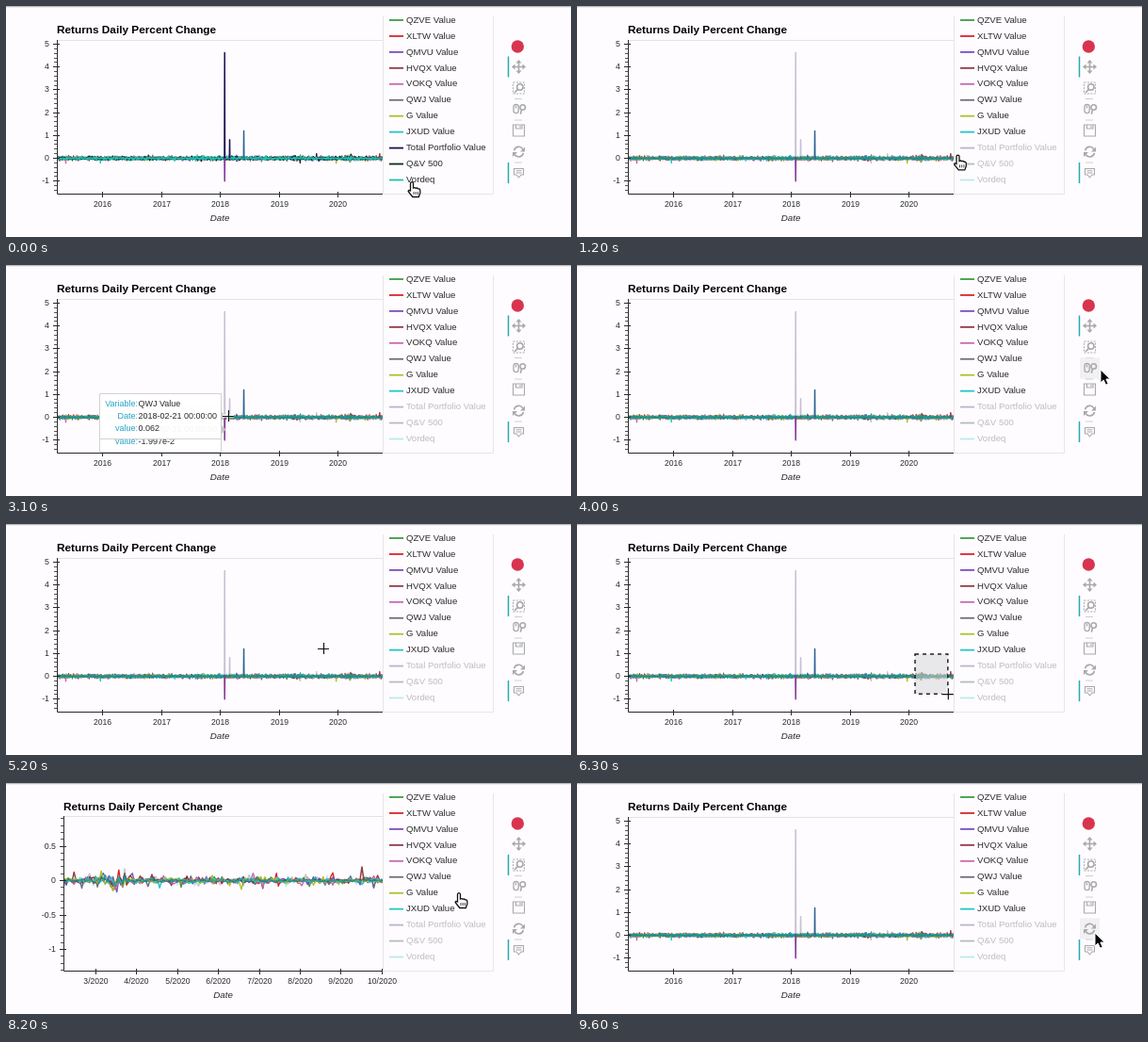
Write an HTML page with a canvas that moves like this. It is 600 px wide and 245 px high and loops after 9.7 s.

```html
<!DOCTYPE html>
<html lang="en">
<head>
<meta charset="utf-8">
<title>Returns chart</title>
<style>
html, body { margin: 0; width: 600px; height: 245px; overflow: hidden; background: #fefcff; }
canvas { display: block; }
</style>
</head>
<body>
<canvas id="stage" width="600" height="245"></canvas>
<script>
const LOOP = 9700, STEP = 100, GLIDE = 900;
const TOOL_CLICK = 4500, DRAG = 5700, ZOOM = 6600, RESET = 8900;
const WIDTH = 600, HEIGHT = 245, RIGHT = 400, BOTTOM = 199;
const FONT = '"Liberation Sans", Arial, sans-serif';
const PAPER = '#fefcff', INK = '#2a2a2a', GRAY = '#a9a9a9', TEAL = '#26aab5';
const ctx = document.getElementById('stage').getContext('2d');

const series = [
  ['QZVE Value', '#3f9a43'], ['XLTW Value', '#d6262b'], ['QMVU Value', '#7c4fc0'],
  ['HVQX Value', '#8f3c46'], ['VOKQ Value', '#c768b2'], ['QWJ Value', '#706c7a'],
  ['G Value', '#a9c526'], ['JXUD Value', '#1fc8cb'], ['Total Portfolio Value', '#1d0f52'],
  ['Q&V 500', '#0a2e12'], ['Vordeq', '#1ebfb2']
].map(([name, color], i) => ({
  name, color,
  // the last three are clicked one by one, from the bottom up
  muteAt: i < 8 ? Infinity : 300 + 250 * (10 - i)
}));
const [, , , brown, , grey, , cyan, portfolio] = series;

const spikes = [
  { year: 2018.08, value: -1, color: '#86379a' },
  { year: 2018.08, value: 4.63, color: portfolio.color, owner: portfolio },
  { year: 2018.165, value: 0.82, color: portfolio.color, owner: portfolio },
  { year: 2018.405, value: 1.2, color: '#2c6291' },
  { year: 2020.71, value: 0.2, color: brown.color }
];

function makeView(left, top, zero, unit, yStep, minor, x0, year0, perYear, xTicks) {
  return {
    left, top, yStep, minor, xTicks,
    x: t => x0 + perYear * (t - year0),
    year: x => year0 + (x - x0) / perYear,
    y: v => zero - v * unit,
    value: y => (zero - y) / unit
  };
}
const range = (n, f) => Array.from({ length: n }, (_, i) => f(i));
const fullView = makeView(54, 36, 161.5, 24.2, 1, 0.2, 102, 2016, 62.6,
  range(5, i => [2016 + i, 2016 + i]));
const zoomView = makeView(61, 35, 103.5, 73, 0.5, 0.1, 95, 2020 + 2 / 12, 520.8,
  range(8, i => [2020 + (i + 2) / 12, `${i + 3}/2020`]));

// the pointer leaves for (x, y) at the given time and gets there before the next move
const moves = [
  [0, 431, 187], [100, 434, 156], [1000, 200, 175], [2100, 252.7, 148.1], [2500, 236, 160],
  [3100, 556, 111], [4100, 548, 88], [4500, 337, 132], [5200, 359, 138], [DRAG, 406, 195],
  [6900, 246, 115], [7600, 380, 98], [8100, 481, 117], [8200, 550, 159]
];

function pointer(t) {
  const i = Math.max(1, moves.findLastIndex(m => m[0] <= t));
  const [, x0, y0] = moves[i - 1], [start, x1, y1] = moves[i];
  const next = i + 1 < moves.length ? moves[i + 1][0] : LOOP;
  const k = Math.min(1, Math.max(0, (t - start) / Math.min(GLIDE, next - start)));
  const ease = k * k * (3 - 2 * k);
  return { x: x0 + (x1 - x0) * ease, y: y0 + (y1 - y0) * ease };
}

function random(a, b) {
  const v = Math.sin(a * 127.1 + b * 311.7) * 43758.5453;
  return v - Math.floor(v);
}
const bell = (seed, day) => random(seed, day) + random(seed + 20, day) + random(seed + 40, day) - 1.5;

// own noise with fat tails, rare shocks, and a market swing shared by all series in March 2020
function dailyReturn(s, day, year) {
  const n = bell(s, day);
  const crash = Math.exp(-(((year - 2020.2) / 0.03) ** 2));
  const shock = random(s + 70, day) > 0.9994 ? 0.2 * Math.sign(n) : 0;
  return 0.022 * n + 0.035 * n ** 3 + shock + crash * (0.12 * bell(90, day) + 0.035 * n);
}

function line(c, color, width, ...points) {
  c.strokeStyle = color;
  c.lineWidth = width;
  c.beginPath();
  for (let i = 0; i < points.length; i += 2) c.lineTo(points[i], points[i + 1]);
  c.stroke();
}

function text(c, str, x, y, size, color = INK, align = 'left', style = '') {
  c.font = `${style} ${size}px ${FONT}`;
  c.fillStyle = color;
  c.textAlign = align;
  c.textBaseline = 'middle';
  c.fillText(str, x, y);
}

function clipped(c, x, y, w, h, paint) {
  c.save();
  c.beginPath();
  c.rect(x, y, w, h);
  c.clip();
  paint();
  c.restore();
}

function drawData(c, view, t) {
  const alpha = s => s && t >= s.muteAt ? 0.25 : 1;
  const firstDay = Math.floor((Math.max(2015.23, view.year(view.left)) - 2015) * 252) - 1;
  c.lineJoin = 'round';
  series.forEach((s, i) => {
    const points = [];
    for (let day = firstDay; day < 1462; day++) {
      const year = 2015 + day / 252;
      points.push(view.x(year), view.y(dailyReturn(i, day, year)));
    }
    c.globalAlpha = alpha(s);
    line(c, s.color, 1.4, ...points);
  });
  for (const { year, value, color, owner } of spikes) {
    c.globalAlpha = alpha(owner);
    line(c, color, 1.5, view.x(year - 0.004), view.y(0), view.x(year), view.y(value),
      view.x(year + 0.004), view.y(0));
  }
}

function drawAxes(c, view) {
  const { left, top } = view;
  const ticks = (step, paint) => {
    const last = Math.floor(view.value(top) / step);
    for (let i = Math.ceil(view.value(BOTTOM) / step); i <= last; i++) {
      paint(i * step, Math.floor(view.y(i * step)) + 0.5);
    }
  };
  line(c, INK, 1, left + 0.5, top, left + 0.5, BOTTOM + 0.5, RIGHT, BOTTOM + 0.5);
  ticks(view.minor, (v, y) => line(c, '#555', 1, left - 3, y, left, y));
  ticks(view.yStep, (v, y) => {
    line(c, INK, 1, left - 4, y, left + 3, y);
    text(c, v, left - 8, y, 8.8, INK, 'right');
  });
  for (const [year, label] of view.xTicks) {
    const x = Math.round(view.x(year)) + 0.5;
    line(c, INK, 1, x, 197, x, 203);
    text(c, label, x, 211, 8.6, INK, 'center');
  }
  text(c, 'Date', (left + RIGHT) / 2, 225, 9.8, INK, 'center', 'italic');
}

function drawLegend(c, t) {
  c.fillStyle = PAPER;
  c.fillRect(RIGHT, 11, 117, BOTTOM - 11);
  line(c, '#e6e6e6', 1, RIGHT + 0.5, 11, RIGHT + 0.5, BOTTOM + 0.5, 517.5, BOTTOM + 0.5, 517.5, 11);
  clipped(c, RIGHT, 10, 117, BOTTOM - 10, () => series.forEach((s, i) => {
    const y = 15 + 16.95 * i;
    c.globalAlpha = t >= s.muteAt ? 0.3 : 1;
    line(c, s.color, 1.8, 407, y, 422, y);
    text(c, s.name, 425, y, 9.6);
  }));
}

// the chart is repainted only when its state changes
const layer = document.createElement('canvas');
layer.width = WIDTH;
layer.height = HEIGHT;
const layerCtx = layer.getContext('2d');
let layerKey;
function chart(view, t) {
  const key = view.left + ':' + series.filter(s => t >= s.muteAt).length;
  if (key !== layerKey) {
    const { left, top } = view;
    layerKey = key;
    layerCtx.clearRect(0, 0, WIDTH, HEIGHT);
    text(layerCtx, 'Returns Daily Percent Change', left, 26, 11.8, '#000', 'left', 'bold');
    line(layerCtx, '#e3e3e3', 1, left, top + 0.5, RIGHT, top + 0.5);
    clipped(layerCtx, left, top, RIGHT - left, BOTTOM - top, () => drawData(layerCtx, view, t));
    drawAxes(layerCtx, view);
    drawLegend(layerCtx, t);
  }
  return layer;
}

function shape(d, fill, stroke, width = 1.3) {
  const p = new Path2D(d);
  if (fill) { ctx.fillStyle = fill; ctx.fill(p); }
  if (stroke) { ctx.strokeStyle = stroke; ctx.lineWidth = width; ctx.stroke(p); }
}

function dashed(dash, ...args) {
  ctx.setLineDash(dash);
  shape(...args);
  ctx.setLineDash([]);
}

const icons = [
  function pan() {
    shape('M-6 0H6M0-6V6', null, GRAY, 1.6);
    shape('M0-7.5l3 3.5h-6zM0 7.5l3-3.5h-6zM-7.5 0l3.5-3v6zM7.5 0l-3.5-3v6z', GRAY);
  },
  function boxZoom() {
    dashed([2, 1.4], 'M-6-6H6V6H-6z', null, GRAY, 1);
    shape('M4.5-1a3.2 3.2 0 1 1-6.4 0a3.2 3.2 0 1 1 6.4 0M-1 1.4L-4.5 5', null, GRAY, 1.6);
  },
  function wheelZoom() {
    shape('M-5.5-2.5a2.6 2.6 0 0 1 5.2 0v4a2.6 2.6 0 0 1-5.2 0zM-3-4v3', null, GRAY);
    shape('M7-2a2.8 2.8 0 1 1-5.6 0a2.8 2.8 0 1 1 5.6 0M3 .8L1.8 5.3', null, GRAY, 1.6);
  },
  function save() {
    shape('M-6-6H6V6H-6zM-3-6v4h6.5v-4M1.5-5v2', null, GRAY, 1.1);
  },
  function reset() {
    shape('M-4.9-1.2a5 5 0 0 1 9.2-1.5M4.9 1.5a5 5 0 0 1-9.2 1.5', null, GRAY, 1.6);
    shape('M6.5-5v5h-5zM-6.5 5.5v-5h5z', GRAY);
  },
  function hover() {
    shape('M-5-4.5H5V2H2.5L0 5L-2.5 2H-5zM-3-2.3H3M-3 0H3', null, GRAY, 1.1);
  }
];

function drawToolbar(t, p) {
  shape('M550 43a6.7 6.7 0 1 1-13.4 0a6.7 6.7 0 1 1 13.4 0', '#d8344f');
  const activeTools = [t < TOOL_CLICK || t >= LOOP ? 0 : 1, 5];
  icons.forEach((icon, i) => {
    const y = 64.5 + 22.5 * i;
    if (p.x > 533 && p.x < 557 && Math.abs(p.y - y) < 11) {
      ctx.fillStyle = '#f1f0f2';
      ctx.fillRect(534, y - 11, 21, 22);
    }
    if (activeTools.includes(i)) line(ctx, TEAL, 1.5, 533.5, y - 11, 533.5, y + 11);
    if (i === 1 || i === 2 || i === 4) line(ctx, '#cfcfcf', 1, 540, y + 11.5, 548, y + 11.5);
    ctx.save();
    ctx.translate(544.5, y);
    icon();
    ctx.restore();
  });
}

function drawTooltip(x, y, name, date, value) {
  const left = Math.round(x > 227 ? x - 137.5 : x + 7.5) + 0.5, top = Math.round(y) - 23.5;
  shape(`M${left} ${top}h129v48h-129z`, 'rgba(255,255,255,.95)', '#d2d2d2', 1);
  if (x > 227) shape(`M${left + 129} ${top + 19}l5 5l-5 5z`, '#c4c4c4');
  [['Variable:', name], ['Date:', date], ['value:', value]].forEach(([label, content], i) => {
    const rowY = top + 11 + 13 * i;
    text(ctx, label, left + 40.5, rowY, 9, '#26a3c4', 'right');
    text(ctx, content, left + 41, rowY, 9);
  });
}

function drawHover(view, p) {
  const year = view.year(p.x), whole = Math.floor(year);
  const day = new Date(Date.UTC(whole, 0, 1 + Math.floor((year - whole) * 365)));
  const date = day.toISOString().slice(0, 10) + ' 00:00:00';
  drawTooltip(p.x, p.y + 14, cyan.name, date, '-1.997e-2');
  drawTooltip(p.x, p.y, grey.name, date, view.value(p.y).toFixed(3));
}

// cross over the plot, hand over the legend, arrow elsewhere
function drawPointer({ x, y }) {
  ctx.save();
  ctx.translate(x, y);
  if (x < RIGHT) {
    shape('M-6 0H6M0-6V6', null, '#fff', 3);
    shape('M-6 .5H6M.5-6V6', null, '#111', 1.2);
  } else if (x < 518) {
    shape('M-1.5 9V1.2a1.5 1.5 0 0 1 3 0V6q1.4-1 2.6.3q1.5-.8 2.5.6q2-.4 2.2 1.6v3L7.3 15.5H.8L-3.8 9.7q-.4-2 2.3-.7z',
      '#fff', '#111', 1.3);
    shape('M2 10v3M4.2 10v3M6.4 10v3', null, '#111', 0.8);
  } else {
    shape('M0 0V14L3.2 11L5.6 16.2L8.2 15L5.9 10H10.3z', '#000', '#fff', 1);
  }
  ctx.restore();
}

function draw() {
  const t = Math.floor(performance.now() % LOOP / STEP) * STEP;
  const view = t >= ZOOM && t < RESET ? zoomView : fullView;
  const p = pointer(t);
  ctx.fillStyle = PAPER;
  ctx.fillRect(0, 0, WIDTH, HEIGHT);
  line(ctx, '#b9b9b9', 1.2, 0, 0.6, WIDTH, 0.6);
  ctx.drawImage(chart(view, t), 0, 0);
  drawToolbar(t, p);
  if (t > DRAG && t < ZOOM) {
    const start = pointer(DRAG);
    dashed([4, 4], `M${start.x} ${start.y}H${Math.min(p.x, RIGHT)}V${p.y}H${start.x}z`,
      'rgba(211,211,211,.5)', '#222', 1.5);
  }
  if ((t >= 2200 && t < 3300) || (t >= 7200 && t < 7700)) drawHover(view, p);
  drawPointer(p);
  requestAnimationFrame(draw);
}
draw();
</script>
</body>
</html>
```
